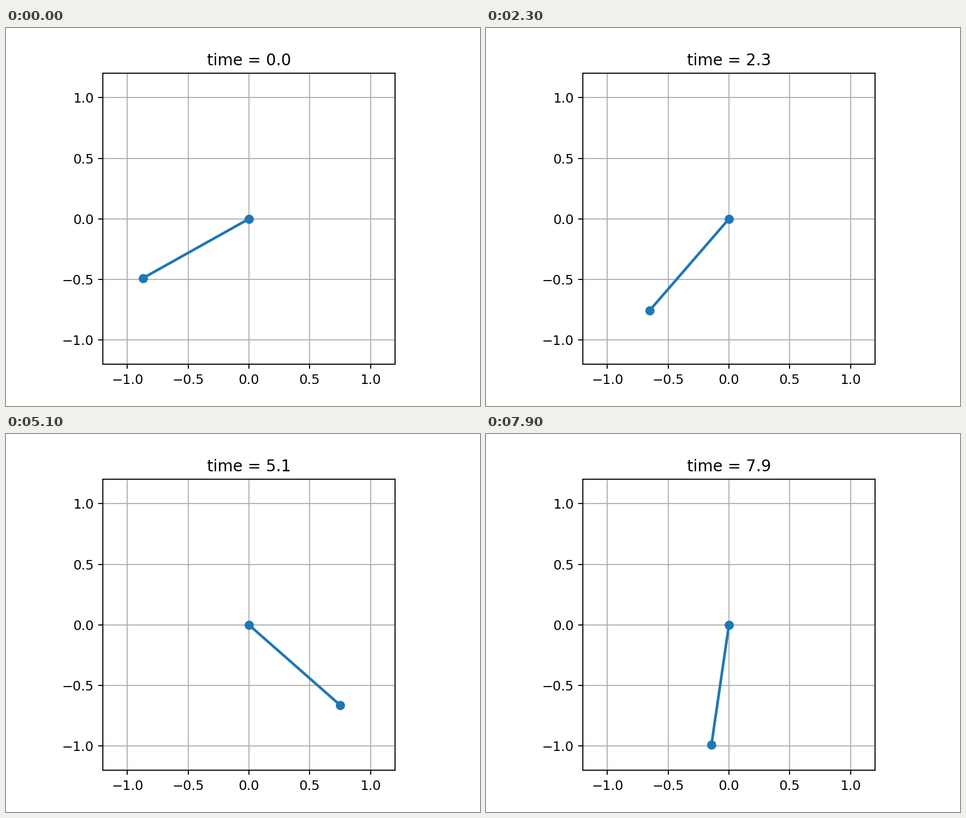
Write a matplotlib script that moves like this. It is 837 px wide and 669 px high and loops after 8000 ms.

```python
import numpy as np
import matplotlib.pyplot as plt
from matplotlib.animation import FuncAnimation

FRAMES = 80
INTERVAL = 100          # ms
SUBSTEPS = 20

GRAVITY = 9.8
DAMPING = 0.1
START = np.array([-1.06, 1.5])  # angle from straight down, angular velocity


def slope(state):
    angle, speed = state
    return np.array([speed, -GRAVITY * np.sin(angle) - DAMPING * speed])


def rk4(state, h):
    k1 = slope(state)
    k2 = slope(state + h / 2 * k1)
    k3 = slope(state + h / 2 * k2)
    k4 = slope(state + h * k3)
    return state + h / 6 * (k1 + 2 * k2 + 2 * k3 + k4)


def swing():
    """Angle of the damped pendulum at every frame."""
    h = INTERVAL / 1000 / SUBSTEPS
    state, angles = START, []
    for _ in range(FRAMES):
        angles.append(state[0])
        for _ in range(SUBSTEPS):
            state = rk4(state, h)
    return angles


angles = swing()

plt.rcParams["font.family"] = "DejaVu Sans"
fig, ax = plt.subplots(figsize=(5.0045, 4), dpi=167.25)  # 837 x 669 px
ax.set_aspect("equal")
ax.set_xlim(-1.2, 1.2)
ax.set_ylim(-1.2, 1.2)
ax.set_xticks(np.arange(-1, 1.1, 0.5))
ax.set_yticks(np.arange(-1, 1.1, 0.5))
ax.grid()
title = ax.set_title("time = 0.0")
rod, = ax.plot([], [], "o-", lw=2)


def draw(i):
    a = angles[i]
    rod.set_data([0, np.sin(a)], [0, -np.cos(a)])
    title.set_text(f"time = {i * INTERVAL / 1000:.1f}")
    return rod, title


anim = FuncAnimation(fig, draw, frames=FRAMES, interval=INTERVAL, repeat=True)
plt.show()
```
